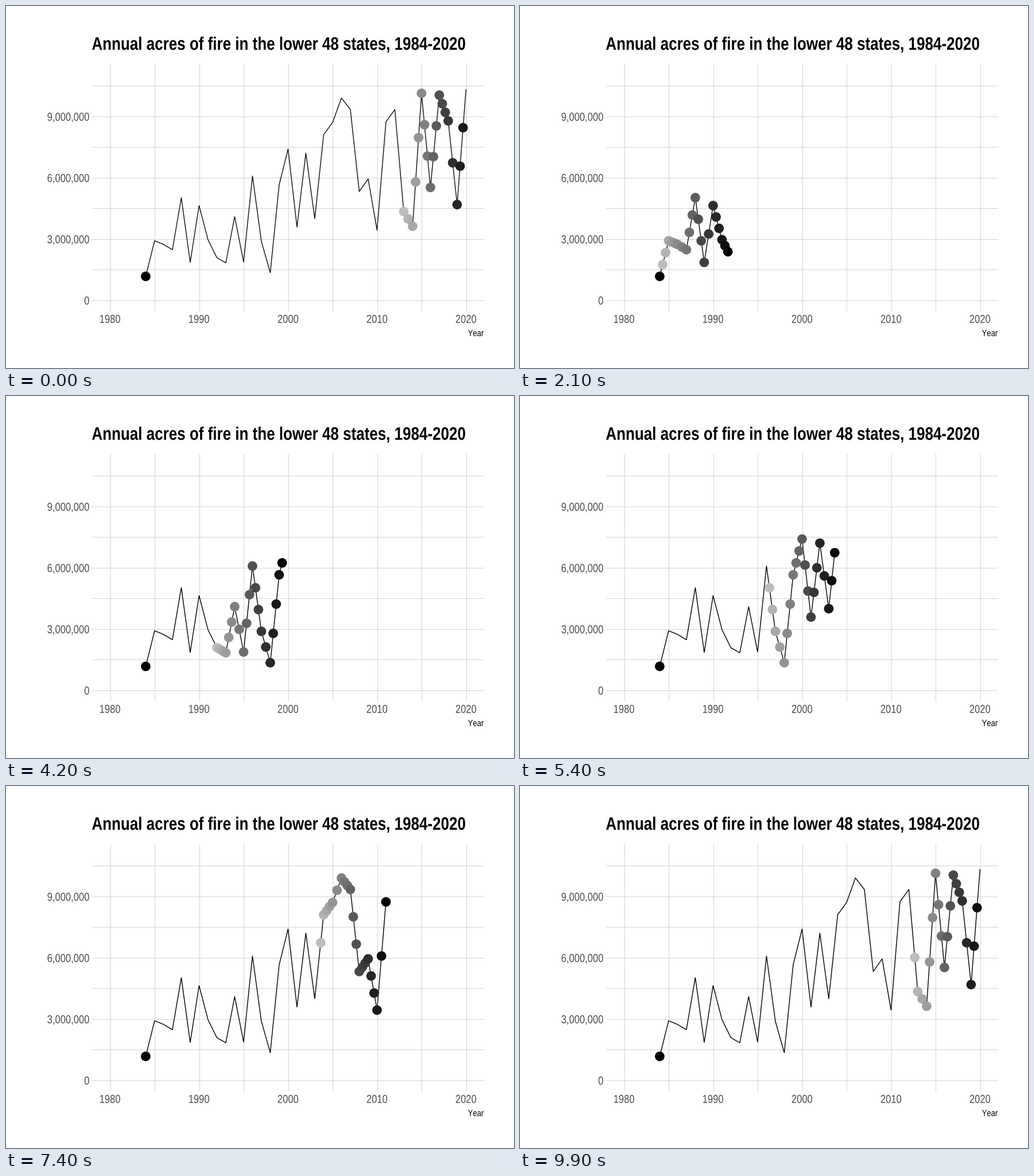
Recreate the animation shown at these times as a matplotlib script. Size 885 px wide and 632 px high, loop 10 s.

```python
import numpy as np
import matplotlib.pyplot as plt
from matplotlib.animation import FuncAnimation
from matplotlib.patches import PathPatch
from matplotlib.textpath import TextPath
from matplotlib.transforms import Affine2D

W, H, DPI = 885, 632, 100
FRAMES, WAKE = 100, 20
PX = 72 / DPI                  # points per pixel
CONDENSE = 0.82                # narrow cut of the sans face
AXIS_TEXT = "#4d4d4d"
plt.rcParams["text.kerning_factor"] = 6    # unkerned text

YEARS = np.arange(1984, 2021)
ACRES = np.array([             # millions
    1.155, 2.90, 2.72, 2.46, 5.01, 1.84, 4.62, 2.95, 2.07, 1.82,
    4.08, 1.86, 6.07, 2.87, 1.335, 5.64, 7.39, 3.57, 7.19, 3.98,
    8.09, 8.69, 9.89, 9.33, 5.31, 5.93, 3.42, 8.72, 9.33, 4.33,
    3.61, 10.12, 5.51, 10.03, 8.77, 4.67, 10.32])

# Each year falls on a whole frame; the steps between are linear.
KEYS = np.round((YEARS - YEARS[0]) * (FRAMES - 1) / (len(YEARS) - 1))


def px(year):
    return 181.4 + 15.5 * (np.asarray(year) - 1980)


def py(millions):
    return 513.2 - 35.65 * np.asarray(millions)


def wake_grey(age):
    """Black to grey along CIE lightness."""
    light = 76.6 * age / WAKE
    lum = ((light + 16) / 116) ** 3 if light > 8 else light / 903.3
    v = 12.92 * lum if lum <= 0.0031308 else 1.055 * lum ** (1 / 2.4) - 0.055
    return (v, v, v)


fig = plt.figure(figsize=(W / DPI, H / DPI), dpi=DPI, facecolor="white")
ax = fig.add_axes([0, 0, 1, 1])
ax.set_xlim(0, W)
ax.set_ylim(H, 0)
ax.axis("off")


def label(x, base, text, size, color="black", weight="normal", align=0.0):
    font = {"family": "Liberation Sans", "weight": weight}
    path = TextPath((0, 0), text, size=size, prop=font)
    path = path.transformed(Affine2D().scale(CONDENSE, -1))
    box = path.get_extents()
    shift = x - box.x0 - align * box.width
    path = path.transformed(Affine2D().translate(shift, base))
    ax.add_patch(PathPatch(path, facecolor=color, linewidth=0, zorder=2))


grid = dict(color="#d4d4d4", linewidth=PX, zorder=1)
for year in range(1980, 2021, 5):
    x = np.floor(px(year)) + 0.5
    ax.plot([x, x], [101, 532], **grid)
for m in np.arange(0, 11, 1.5):
    y = np.floor(py(m)) + 0.5
    ax.plot([150, 832], [y, y], **grid)

label(150, 76.5, "Annual acres of fire in the lower 48 states, 1984-2020",
      31.7, weight="bold")
for year in range(1980, 2021, 10):
    label(px(year), 553.3, str(year), 20.2, AXIS_TEXT, align=0.5)
for m in range(0, 10, 3):
    label(144.7, py(m) + 8, f"{m * 10**6:,}", 20.2, AXIS_TEXT, align=1)
label(832, 576.3, "Year", 15.9, align=1)

line, = ax.plot([], [], linewidth=1.4 * PX, solid_joinstyle="round",
                solid_capstyle="butt", zorder=3)
dots = ax.scatter([], [], s=(16.7 * PX) ** 2, linewidths=0, zorder=4)


def year_at(frame):
    return np.interp(frame, KEYS, YEARS)


def spot(year):
    return px(year), py(np.interp(year, YEARS, ACRES))


def draw(frame):
    # The finished line lingers on top while it fades.
    fading = frame < WAKE
    now = YEARS[-1] if fading else year_at(frame)
    line.set_data(*spot(np.append(YEARS[YEARS < now], now)))
    line.set_color(wake_grey(frame + 1) if fading else "black")

    points, colors = [], []
    for age in range(WAKE, -1, -1):
        k = (frame - age) % FRAMES
        if 0 < k < FRAMES - 1:
            points.append(spot(year_at(k)))
            colors.append(wake_grey(age))
    points.append(spot(YEARS[0]))
    colors.append((0, 0, 0))
    dots.set_offsets(points)
    dots.set_facecolor(colors)
    return line, dots


anim = FuncAnimation(fig, draw, frames=FRAMES, interval=100,
                     repeat=True, repeat_delay=0, blit=False)
plt.show()
```
